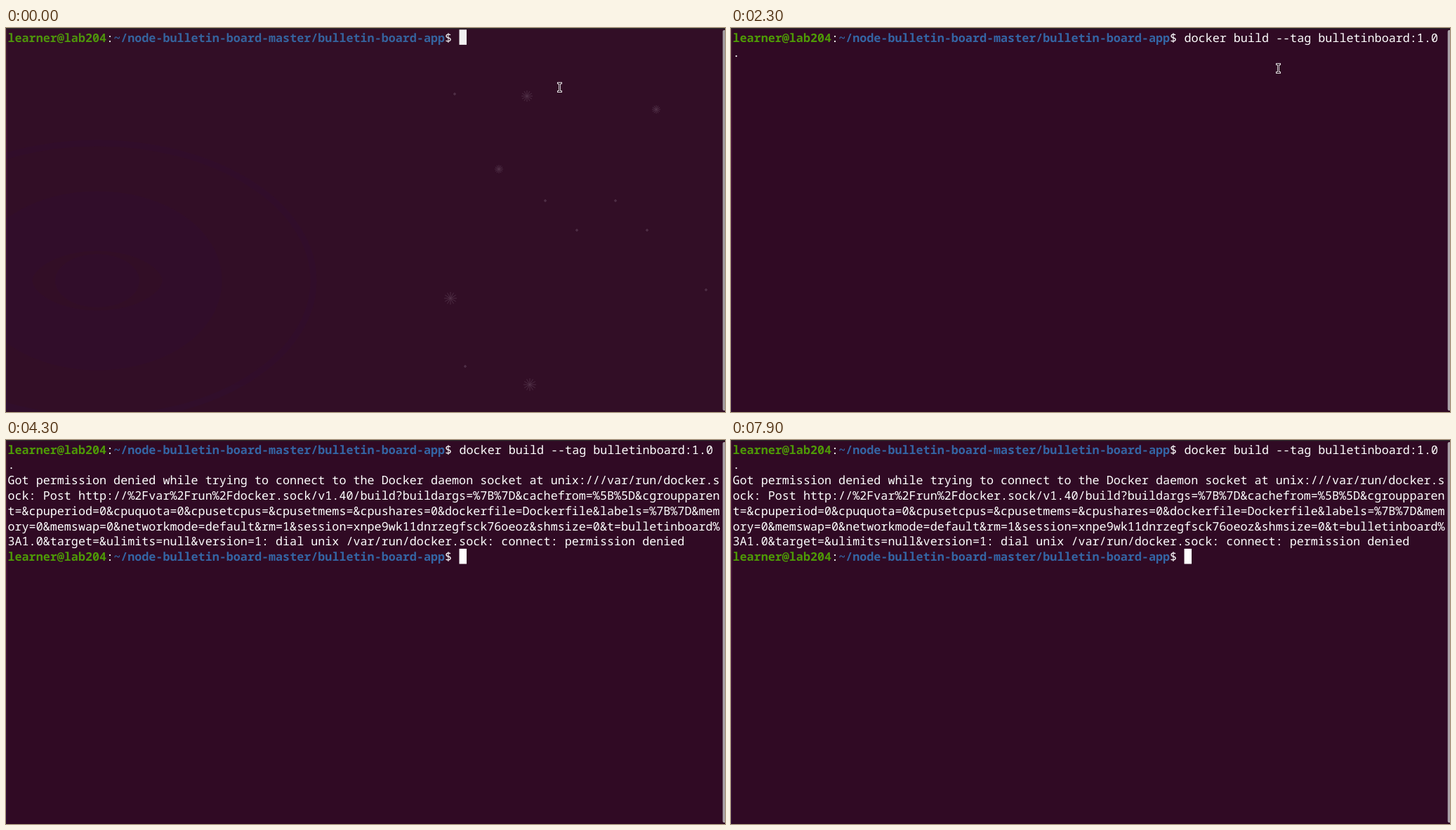
Recreate the animation shown at these times as an HTML page. Size 1024 px wide and 547 px high, loop 8000 ms.

```html
<!DOCTYPE html>
<html lang="en">
<head>
<meta charset="utf-8">
<title>Terminal session</title>
<style>
  html, body { margin: 0; width: 100%; height: 100%; overflow: hidden; background: #300a24; }
  svg { display: block; width: 100%; height: 100%; }
  text {
    font: 16.745px "Noto Sans Mono", "DejaVu Sans Mono", monospace;
    fill: #fff; white-space: pre; text-rendering: geometricPrecision;
  }
  .user { fill: #4e9a06; font-weight: 700; }
  .path { fill: #3465a4; font-weight: 700; }
</style>
</head>
<body>
<svg viewBox="0 0 1024 547">
  <defs>
    <linearGradient id="edge" x2="0" y2="1">
      <stop stop-color="#40142f"/>
      <stop offset=".28" stop-color="#4e1540"/>
      <stop offset="1" stop-color="#300c36"/>
    </linearGradient>
  </defs>
  <rect width="1024" height="547" fill="#300a24"/>
  <rect width="1.5" height="547" fill="url(#edge)"/>
  <rect width="1024" height="1.3" fill="#2b2a2a"/>
  <rect x="1020.7" y="3" width="5" height="542" rx="2" fill="#aaa2a8"/>
  <g id="screen"></g>
  <rect id="caret" width="10.5" height="21.6" fill="#fff"/>
  <g id="wallpaper">
    <rect width="1024" height="547" fill="#4d4a4d" opacity=".07"/>
    <g fill="none" stroke="#3000a0" opacity=".035">
      <ellipse cx="130" cy="360" rx="308" ry="196" stroke-width="9"/>
      <ellipse cx="130" cy="360" rx="135" ry="85" stroke-width="85"/>
      <ellipse cx="130" cy="360" rx="60" ry="38" fill="#3000a0" stroke="none"/>
    </g>
    <g id="stars" fill="#4b2b43" stroke="#54344b" stroke-width=".8"></g>
  </g>
  <g id="pointer" fill="none" stroke-linecap="square">
    <path d="M-2-6H2M0-6V6M-2 6H2" stroke="#ddd5da" stroke-width="3"/>
    <path d="M-2-6H2M0-6V6M-2 6H2" stroke="#220a1b" stroke-width="1"/>
  </g>
</svg>
<script>
const LOOP = 8000, LEFT = 2.5, TOP = 2.3, COLUMN = 10.047, ROW = 21.8;
const PROMPT_LENGTH = 64;
const byId = id => document.getElementById(id);
const screen = byId("screen"), caret = byId("caret");
const wallpaper = byId("wallpaper"), pointer = byId("pointer"), stars = byId("stars");

function add(parent, tag, attributes = {}, content = "") {
  const node = document.createElementNS("http://www.w3.org/2000/svg", tag);
  for (const name in attributes) node.setAttribute(name, attributes[name]);
  node.textContent = content;
  return parent.appendChild(node);
}

function addText(row, content, column = 0) {
  return add(screen, "text", { x: LEFT + column * COLUMN, y: TOP + row * ROW + 17.2 }, content);
}

function addPrompt(row) {
  const line = addText(row, "");
  add(line, "tspan", { class: "user" }, "learner@lab204");
  add(line, "tspan", {}, ":");
  add(line, "tspan", { class: "path" }, "~/node-bulletin-board-master/bulletin-board-app");
  add(line, "tspan", {}, "$ ");
  return line;
}

addPrompt(0);
const command = [
  addText(0, "docker build --tag bulletinboard:1.0", PROMPT_LENGTH),
  addText(1, ".")
];
const output = [
  "Got permission denied while trying to connect to the Docker daemon socket at unix:///var/run/docker.s",
  "ock: Post http://%2Fvar%2Frun%2Fdocker.sock/v1.40/build?buildargs=%7B%7D&cachefrom=%5B%5D&cgroupparen",
  "t=&cpuperiod=0&cpuquota=0&cpusetcpus=&cpusetmems=&cpushares=0&dockerfile=Dockerfile&labels=%7B%7D&mem",
  "ory=0&memswap=0&networkmode=default&rm=1&session=xnpe9wk11dnrzegfsck76oeoz&shmsize=0&t=bulletinboard%",
  "3A1.0&target=&ulimits=null&version=1: dial unix /var/run/docker.sock: connect: permission denied"
].map((line, i) => addText(i + 2, line));
output.push(addPrompt(7));

// Stars: x, y, ray length
for (const [x, y, r] of [[742, 97, 8], [926, 116, 6], [702, 201, 6], [633, 385, 9], [746, 508, 9]]) {
  let d = "";
  for (let i = 0; i < 6; i++) {
    const dx = r * Math.cos(i * Math.PI / 6), dy = r * Math.sin(i * Math.PI / 6);
    d += `M${x - dx} ${y - dy}L${x + dx} ${y + dy}`;
  }
  add(stars, "path", { d });
}
for (const [cx, cy] of [[639, 94], [768, 246], [868, 246], [813, 288], [913, 288], [997, 373], [654, 482]])
  add(stars, "circle", { cx, cy, r: 1.4 });

const show = (node, visible) => node.setAttribute("visibility", visible ? "visible" : "hidden");

function caretAt(t) {
  if (t < 1700) return [PROMPT_LENGTH, 0, true];
  if (t < 3100) return [1, 1, t < 2300];
  if (t < 3200) return [0, 2, true];
  return [PROMPT_LENGTH, 7, t < 3700 || Math.floor((t - 3700) / 600) % 2 === 1];
}

function draw(t) {
  const step = Math.min(Math.floor(t / 100), 3) / 3;
  wallpaper.setAttribute("opacity", 1 - step);
  pointer.setAttribute("transform", `translate(${788.5 - 9 * step} ${84.5 - 27 * step})`);
  show(pointer, t < 3100);
  command.forEach(line => show(line, t >= 1700));
  output.forEach(line => show(line, t >= 3200));

  const [column, row, visible] = caretAt(t);
  caret.setAttribute("x", LEFT + column * COLUMN);
  caret.setAttribute("y", TOP + row * ROW);
  show(caret, visible);
}

const start = performance.now();
function tick() {
  draw((performance.now() - start) % LOOP);
  requestAnimationFrame(tick);
}
tick();
</script>
</body>
</html>
```
